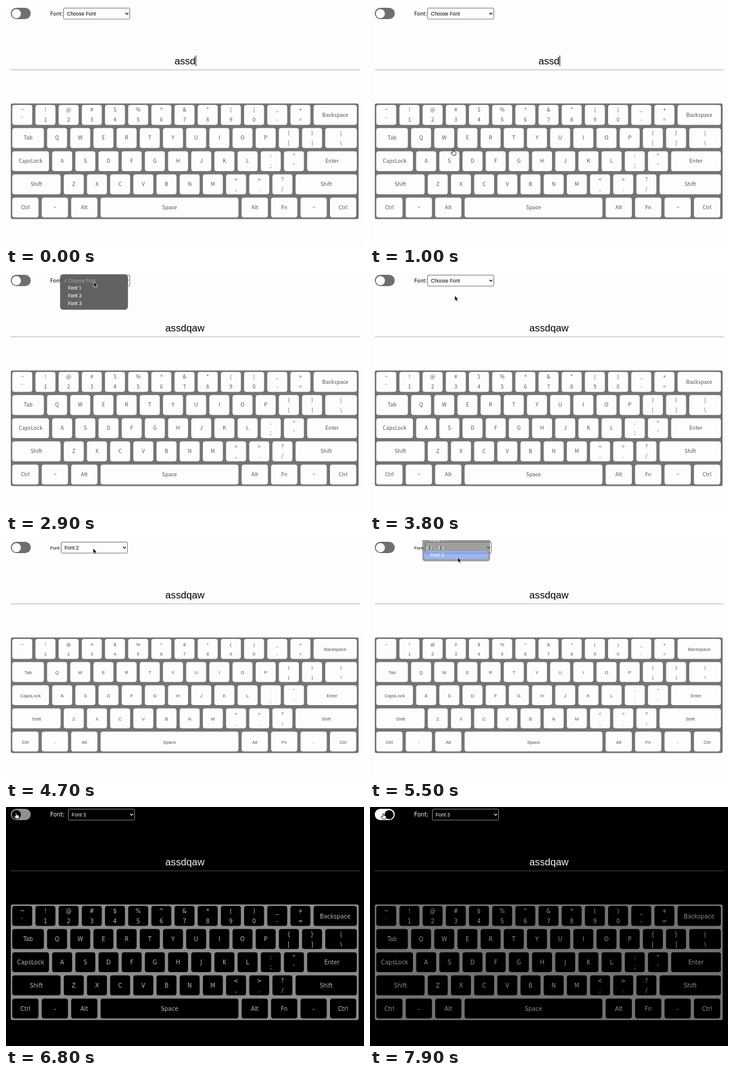
These frames come from a looping animation (600x401 px, 8000 ms). An HTML page:

```html
<!DOCTYPE html>
<html lang="en">
<head>
<meta charset="utf-8">
<title>Keyboard</title>
<style>
html, body { margin: 0; width: 100%; height: 100%; overflow: hidden; }
svg { display: block; width: 600px; height: 401px; }
.ui { font: 8.5px "Liberation Sans", Arial, sans-serif; }
.menu { font: 500 7.7px Inter, sans-serif; }
.typed { font: 16.7px "Liberation Sans", Arial, sans-serif; }
.mid { text-anchor: middle; }
.face0 { font: 8.9px "Noto Sans CJK SC", "Noto Sans CJK JP", "Open Sans", sans-serif; }
.face1 { font: 7.7px "Liberation Sans", Arial, sans-serif; }
.face2 { font: 9.6px "DejaVu Sans", sans-serif; }
</style>
</head>
<body>
<svg id="stage" viewBox="0 0 600 401"></svg>
<script>
const LOOP = 8000, STEP = 100, UNIT = 33.5, GAP = 5.35, PITCH = 38.85;
const ROWS = [
  [UNIT, '~` !1 @2 #3 $4 %5 ^6 &7 *8 (9 )0 _- += Backspace'],
  [53, 'Tab Q W E R T Y U I O P {[ }] |\\'],
  [61.5, 'CapsLock A S D F G H J K L :; "\' Enter'],
  [81, 'Shift Z X C V B N M <, >. ?/ Shift'],
  [44, 'Ctrl ~ Alt Space Alt Fn ~ Ctrl']
];
const OPTIONS = ['Choose Font', 'Font 1', 'Font 2', 'Font 3'];
// time, x, y of the pointer tip
const PATH = [
  [400, 426, 343], [1200, 86, 222], [1300, 86, 222], [1500, 93, 259], [1600, 95, 259],
  [1700, 116, 235], [1900, 122, 224], [2200, 122, 224], [2700, 147, 15], [3000, 147, 15],
  [3300, 146, 36], [3600, 146, 37], [3800, 142, 38], [4100, 142, 38], [4700, 146, 14],
  [4900, 146, 14], [5000, 147, 29], [5900, 147, 29], [6100, 120, 24], [6500, 17, 10],
  [7700, 17, 10], [7800, 20, 10], [7900, 22, 11]
];
const PRESSES = { Q: [1300, 1500], A: [1600, 1900], W: [2000, 2200] };

const stage = document.getElementById('stage');
const esc = s => s.replace(/&/g, '&amp;').replace(/</g, '&lt;');
const clamp = v => Math.max(0, Math.min(1, v));
const ease = v => v * v * (3 - 2 * v);
const mix = (a, b, k) => a + (b - a) * k;
const gray = v => { const n = Math.round(v); return `rgb(${n},${n},${n})`; };
const rect = (x, y, w, h, r, fill, more = '') =>
  `<rect x="${x}" y="${y}" width="${w}" height="${h}" rx="${r}" fill="${fill}" ${more}/>`;
const text = (x, y, s, cls, fill) =>
  `<text x="${x}" y="${y}" class="${cls}" fill="${fill}">${esc(s)}</text>`;

function keyboard(t, face, ink, frame, cap) {
  let out = rect(8, 163.4, 583, 194.2, 3, frame);
  const cls = 'mid face' + face, drop = [0, .6, 1][face];
  ROWS.forEach(([first, labels], r) => {
    const y = 166 + PITCH * r, keys = labels.split(' ');
    let x = 10.5;
    keys.forEach((label, i) => {
      let w = i == 0 ? first : i == keys.length - 1 ? 588 - x : UNIT;
      if (r == 4) w = label == 'Space' ? 231 : 44;
      const span = PRESSES[label];
      const down = span && t >= span[0] && t < span[1];
      out += rect(x, y, w, 33.4, 4, down ? '#b9b9b9' : cap);
      const mid = x + w / 2;
      if (/^[^a-z]{2}$/i.test(label)) {
        out += text(mid, y + 11 + drop, label[0], cls, ink);
        out += text(mid, y + 27.7 + drop, label[1], cls, ink);
      } else {
        const s = label == '~' && face ? ['-', '–'][face - 1] : label;
        out += text(mid, y + 19.6 + drop, s, cls, ink);
      }
      x += w + GAP;
    });
  });
  return out;
}

function menu(x, chosen, hot, alpha) {
  const top = 6 - chosen * 12.8 - 3.4;
  let out = rect(x, top, 113, 58.6, 4.5, '#626262', 'stroke="#4d4d4d" stroke-width=".6"');
  OPTIONS.forEach((s, i) => {
    const y = 15.5 + (i - chosen) * 12.8;
    if (i == hot) out += rect(x + 3, y - 9.2, 107, 12.8, 3, '#5a86ee');
    out += text(x + 13, y, s, 'menu', i ? '#fff' : '#a0a0a0');
    if (i == chosen)
      out += `<path d="M${x + 6} ${y - 2.6}l1.7 2.2 3-5" fill="none" stroke="${i ? '#fff' : '#a0a0a0'}" stroke-width="1"/>`;
  });
  return `<g opacity="${alpha}">${out}</g>`;
}

function pointer(t) {
  if (t < PATH[0][0]) return '';
  let i = PATH.findIndex(p => p[0] > t);
  if (i < 0) i = PATH.length;
  const a = PATH[i - 1], b = PATH[i] || a;
  const k = b == a ? 0 : ease((t - a[0]) / (b[0] - a[0]));
  const hand = t < 2400 || t >= 6400;
  const shape = hand
    ? '<path d="M-.9 5V.6Q0-.6.9.6V3.5Q2 2.8 2.7 3.8 3.8 3.3 4.3 4.4 5.3 4.5 5.2 6L4.4 9.4H-.6L-3.4 5.9Q-3.3 4.6-2.2 4.9L-.9 6Z" fill="#fff" stroke="#111" stroke-width=".9"/>'
    : '<path d="M0 0V8.6L2 6.8 3.4 9.8 5 9.1 3.7 6.2H6.3Z" fill="#000" stroke="#fff" stroke-width=".7"/>';
  return `<g transform="translate(${mix(a[1], b[1], k)} ${mix(a[2], b[2], k)})">${shape}</g>`;
}

function draw(t) {
  const dark = t >= 6800, slide = ease(clamp((t - 6800) / 600));
  const face = t < 3900 ? 0 : t < 5900 ? 1 : 2;
  const choice = [0, 2, 3][face];
  const paper = dark ? '#000' : '#fdfdfe', ink = dark ? '#f4f4f4' : '#000';
  const frame = dark ? gray(mix(139, 114, slide)) : '#747474';
  const keyInk = dark ? gray(mix(182, 140, slide)) : '#555';

  let out = rect(0, 0, 600, 401, 0, paper);

  // theme switch
  out += rect(8, 3, 33.5, 19, 9.5, dark ? gray(mix(143, 255, slide)) : '#6f6f6f');
  out += `<circle cx="${mix(17.4, 32, slide)}" cy="12.8" r="7.6" fill="${paper}"/>`;

  // font chooser
  const sx = [96.5, 92.5, 104.5][face];
  out += text(74, 15.6, 'Font:', 'face' + face, ink);
  out += rect(sx, 3.5, 111, 18.5, 1.5, paper, `stroke="${dark ? '#858585' : '#767676'}"`);
  out += text(sx + 5.5, 15.6, OPTIONS[choice], 'ui', ink);
  out += `<path d="M${sx + 103.7} 11.5l2.4 2.4 2.4-2.4" fill="none" stroke="${ink}" stroke-width="1.2"/>`;

  // typed line
  const typed = 'assd' + (t >= 1300 ? 'q' : '') + (t >= 1600 ? 'a' : '') + (t >= 2000 ? 'w' : '');
  out += text(300, 98, typed, 'typed mid', ink);
  if (t < 100 || t >= 600 && t < 1100) out += rect(317.6, 83, 1, 18, 0, '#000');
  out += rect(8, 106.6, 585, 1, 0, dark ? '#4c4c4c' : '#b0b0b0');

  out += keyboard(t, face, keyInk, frame, paper);

  if (t >= 2800 && t < 3700)
    out += menu(91, 0, t < 3100 ? -1 : t < 3300 ? 1 : 2, 1 - clamp((t - 3400) / 300));
  if (t >= 4800 && t < 5700)
    out += menu(88, 2, t < 5000 ? 2 : 3, 1 - clamp((t - 5300) / 400) * .8);

  stage.innerHTML = out + pointer(t);
}

let last = -1;
function tick(now) {
  const t = Math.floor(now % LOOP / STEP) * STEP;
  if (t != last) draw(last = t);
  requestAnimationFrame(tick);
}
draw(0);
requestAnimationFrame(tick);
</script>
</body>
</html>
```
